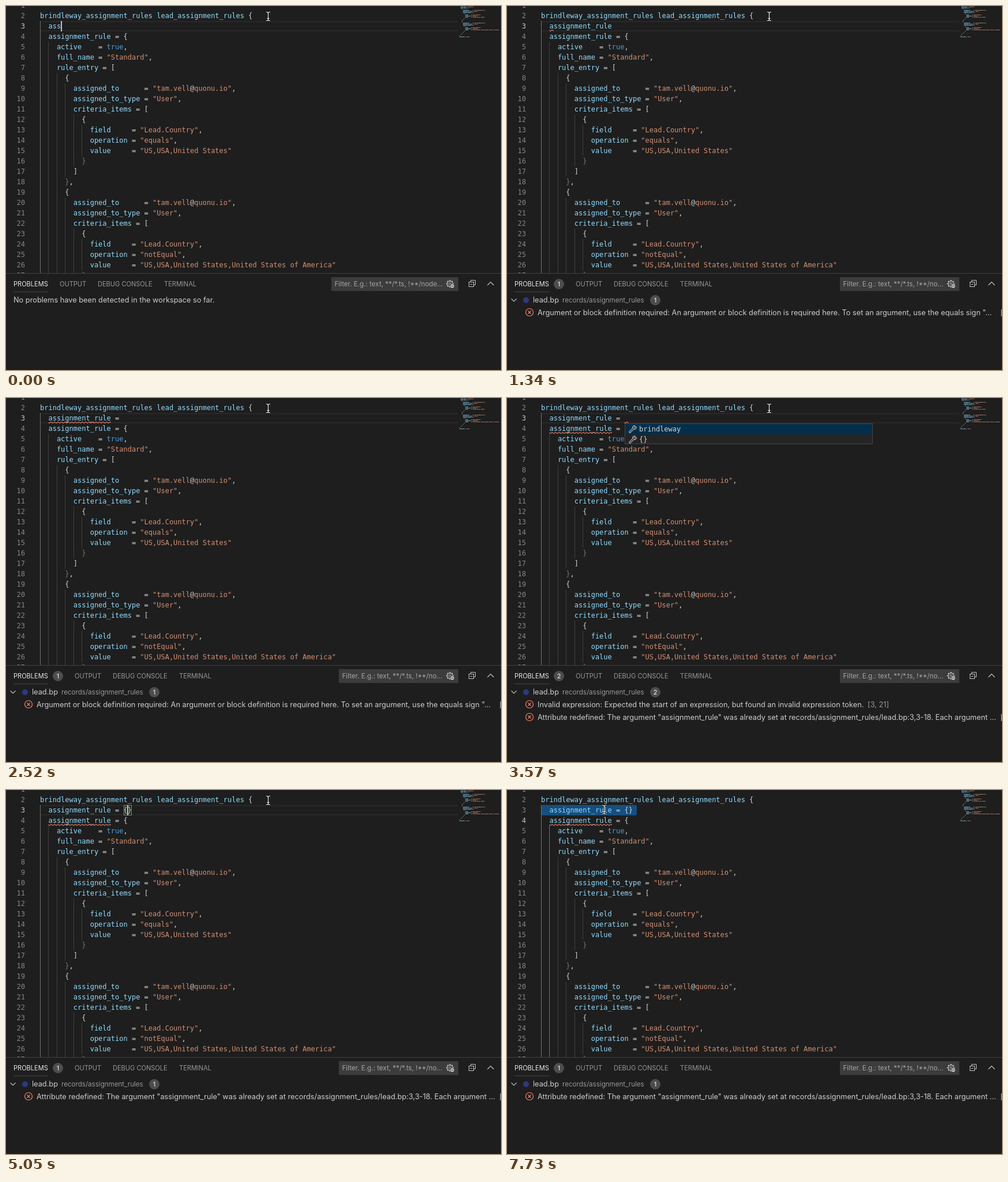
An HTML page with a canvas that plays this animation: 858x631 px, repeating every 8 s.

```html
<!DOCTYPE html>
<html lang="en">
<head>
<meta charset="utf-8">
<title>Editor</title>
<style>
html, body { margin: 0; width: 100%; height: 100%; overflow: hidden; background: #1e1e1e; }
canvas { display: block; }
</style>
</head>
<body>
<canvas id="stage" width="858" height="631"></canvas>
<script>
const ctx = document.getElementById('stage').getContext('2d');
const LOOP = 8000, X0 = 59, CW = 7.222, LH = 18, PANEL_Y = 463;
const MONO = '12px "DejaVu Sans Mono", monospace';
const ui = size => size + 'px Inter, sans-serif';
const BODY = ui(12.77), SMALL = ui(11.6), TAB = ui(11.05);
const BG = '#1e1e1e', FG = '#d4d4d4', PROP = '#8fdcff', STR = '#d38f73',
  KEY = '#4a9cd8', FADED = '#767676', ERR = '#f88065', DIM = '#989898',
  SELECTED = '#164f7f';

const colX = col => X0 + col * CW;
const lineY = n => 26 + (n - 3) * LH;

// Code, starting at line 4; line 2 and the edited line 3 come separately.
const entry = (op, value) => [
  '      {',
  '        assigned_to      = "tam.vell@quonu.io",',
  '        assigned_to_type = "User",',
  '        criteria_items = [',
  '          {',
  '            field     = "Lead.Country",',
  `            operation = "${op}",`,
  `            value     = "${value}"`,
  '          }',
  '        ]'
];
const CODE = [
  '  assignment_rule = {',
  '    active    = true,',
  '    full_name = "Standard",',
  '    rule_entry = [',
  ...entry('equals', 'US,USA,United States'),
  '      },',
  ...entry('notEqual', 'US,USA,United States,United States of America'),
  '      }', '    ]', '  }', '  full_name = "lead"'
];
const HEADER = 'brindleway_assignment_rules lead_assignment_rules {';

const ARG = 'Argument or block definition required: An argument or block definition is required here. To set an argument, use the equals sign "...';
const INVALID = 'Invalid expression: Expected the start of an expression, but found an invalid expression token.';
const REDEFINED = 'Attribute redefined: The argument "assignment_rule" was already set at records/assignment_rules/lead.bp:3,3-18. Each argument ...';

// Timelines: [start in ms, value]
const LINE3 = [[0, '  ass'], [740, '  assignment_rule '], [1930, '  assignment_rule ='],
  [2080, '  assignment_rule = '], [4010, '  assignment_rule = {}']];
const CARET = [[0, 5], [450, -1], [740, 18], [1340, -1], [1930, 19], [2080, 20], [2520, -1],
  [3120, 20], [3570, -1], [4010, 21], [4460, -1], [5050, 21], [5500, -1], [6090, 21],
  [6530, -1], [6980, 15], [7130, 17], [7280, 0], [7730, -1]];
const VALUES = ['brindleway', '{}'];
const POPUP = [[0, null], [450, { col: 5, items: ['assignment_rule'], sel: 0 }], [740, null],
  [1640, { col: 18, items: ['='], sel: 0 }], [1930, null],
  [3570, { col: 20, items: VALUES, sel: 0 }], [3710, { col: 20, items: VALUES, sel: 1 }], [4010, null]];
const ERRORS = [[0, []], [890, [ARG]], [2670, [INVALID, REDEFINED]], [4460, [REDEFINED]]];
// Squiggles: line, column, length
const WAVES = [[0, []], [890, [[3, 2, 1]]], [1640, [[3, 2, 15]]],
  [2670, [[3, 20, 1], [4, 2, 15]]], [4460, [[4, 2, 15]]]];

function at(track, t) {
  let value;
  for (const [start, v] of track) if (t >= start) value = v;
  return value;
}

function rect(x, y, w, h, color) {
  ctx.fillStyle = color;
  ctx.fillRect(x, y, w, h);
}

function text(s, x, y, font, color, align = 'left') {
  ctx.font = font;
  ctx.fillStyle = color;
  ctx.textAlign = align;
  ctx.fillText(s, x, y);
}

function path(points, color, width = 1) {
  ctx.strokeStyle = color;
  ctx.lineWidth = width;
  ctx.beginPath();
  points.forEach(([x, y]) => ctx.lineTo(x, y));
  ctx.stroke();
}

function ring(x, y, r, color, width = 1, from = 0, to = 2 * Math.PI) {
  ctx.strokeStyle = color;
  ctx.lineWidth = width;
  ctx.beginPath();
  ctx.arc(x, y, r, from, to);
  ctx.stroke();
}

function disc(x, y, r, color) {
  ctx.fillStyle = color;
  ctx.beginPath();
  ctx.arc(x, y, r, 0, 2 * Math.PI);
  ctx.fill();
}

// Splits a code line into [column, text, color].
function tokens(line) {
  const out = [];
  for (const m of line.matchAll(/"[^"]*"|\w+|[^\s\w]/g)) {
    let col = m.index;
    if (m[0][0] === '"') {
      for (const part of m[0].split(/(@)/)) {
        out.push([col, part, part === '@' ? FG : STR]);
        col += part.length;
      }
    } else {
      const color = m[0] === 'true' ? KEY : /\w/.test(m[0]) ? PROP : FG;
      out.push([col, m[0], color]);
    }
  }
  return out;
}

function codeLine(line, n) {
  const faded = /^ {6,}\}/.test(line);
  for (const [col, s, color] of tokens(line))
    text(s, colX(col), lineY(n) + 13, MONO, faded && s === '}' ? FADED : color);
}

function guides(active) {
  for (let n = 3; n <= 27; n++) {
    const indent = n === 3 ? 2 : CODE[n - 4].search(/\S/);
    for (let c = 0; c < indent; c += 2)
      rect(Math.round(colX(c)), lineY(n), 1, LH, c <= active ? '#707070' : '#404040');
  }
}

function squiggle([n, col, len]) {
  const x = colX(col), y = lineY(n) + 15, w = len * CW;
  ctx.save();
  ctx.beginPath();
  ctx.rect(x, y, w, 3);
  ctx.clip();
  const points = [];
  for (let i = -6; i < w + 6; i += 6) points.push([x + i + 1.75, y + 2.6], [x + i + 4.75, y + 0.4]);
  path(points, ERR, 1.1);
  ctx.restore();
}

function minimap() {
  CODE.forEach((line, i) => {
    for (const [col, s, color] of tokens(line))
      [...s].forEach((ch, k) => {
        if (ch === ' ') return;
        ctx.globalAlpha = /[.,_"]/.test(ch) ? 0.35 : 0.75;
        rect(784 + col + k, 2 * (i + 4) - 11, 1, 1, color);
      });
  });
  ctx.globalAlpha = 1;
}

function wrench(x, y, bg) {
  const gray = '#c5c5c5';
  ctx.lineCap = 'round';
  ring(x + 3, y - 3, 3, gray, 1.1, -0.3, 1.5 * Math.PI + 0.3);
  path([[x + 1, y - 1], [x - 5, y + 5]], gray, 3.6);
  path([[x + 1.4, y - 1.4], [x - 5, y + 5]], bg, 1.5);
  path([[x + 5.8, y - 4], [x + 3.6, y - 3], [x + 3.2, y - 5.8]], gray, 1);
  ctx.lineCap = 'butt';
}

function popup({ col, items, sel }) {
  const x = Math.round(colX(col) + 0.2), y = 44, h = LH * items.length;
  rect(x, y, 430, h, '#454545');
  rect(x + 1, y + 1, 428, h - 2, '#252526');
  items.forEach((item, i) => {
    const top = y + i * LH, bg = i === sel ? '#022f4c' : '#252526';
    rect(x + 1, top + 1, 428, Math.min(LH, y + h - top - 2), bg);
    wrench(x + 14, top + 10, bg);
    text(item, x + 25, top + 14, MONO, FG);
  });
}

function pointer(t) {
  const u = t < 5500 ? 0 : Math.min(8, Math.floor((t - 5500) / 147.1 + 0.02) + 1) / 8;
  const e = u * u * (3 - 2 * u);
  const x = Math.round(454 - 286 * e) + 0.5;
  const y = Math.round(18 * (1 - e) ** 2 - 12 * e * (1 - e) + 34 * e * e);
  const beam = (color, width) => {
    path([[x, y - 6], [x, y + 6]], color, width);
    for (const s of [-1, 1])
      path([[x - 3.5, y + 7.5 * s], [x - 1.5, y + 7.5 * s], [x, y + 6 * s],
        [x + 1.5, y + 7.5 * s], [x + 3.5, y + 7.5 * s]], color, width);
    path([[x - 2, y + 3.5], [x + 2, y + 3.5]], color, width);
  };
  beam('#111', 2.6);
  beam('#f4f4f4', 1.2);
}

function editor(t) {
  const line3 = at(LINE3, t), caret = at(CARET, t);
  const row = t >= 7280 ? 4 : 3;
  const wordPicked = t >= 7130 && t < 7280;

  ctx.save();
  ctx.beginPath();
  ctx.rect(0, 0, 858, PANEL_Y);
  ctx.clip();

  if (t < 7130) {
    rect(X0, 26, 725, 18, '#282828');
    rect(X0, 28, 725, 14, BG);
  }
  if (wordPicked) {
    const w = 15 * CW;
    rect(colX(2), 26, w, LH, SELECTED);
    for (const [n, col] of [[2, 11], [2, 33], [4, 2]])
      rect(colX(col), lineY(n), w, LH, 'rgba(173,214,255,.15)');
  }
  if (row === 4) {
    ctx.fillStyle = SELECTED;
    ctx.beginPath();
    ctx.roundRect(X0, 26, 166, LH, 3);
    ctx.fill();
  }
  guides(row === 4 ? 2 : 0);
  if (t >= 4010 && t < 6980) {
    rect(204, 26, 14, LH, '#888');
    rect(205, 27, 12, LH - 2, '#1b251b');
  }

  for (let n = 1; n <= 27; n++)
    text(n, 33, lineY(n) + 13, MONO, n === row ? '#c6c6c6' : '#858585', 'right');
  codeLine(HEADER, 2);
  codeLine(line3, 3);
  for (let n = 4; n <= 27; n++) codeLine(CODE[n - 4], n);
  at(WAVES, t).forEach(squiggle);
  minimap();

  if (caret >= 0) rect(Math.floor(colX(caret)), lineY(row), 2, LH, '#c4c5c3');
  const list = at(POPUP, t);
  if (list) popup(list);
  pointer(t);
  ctx.restore();
}

function badge(x, y, n) {
  disc(x, y, 9, '#4d4d4d');
  text(n, x, y + 4, ui(11), '#fff', 'center');
}

function toolIcons() {
  const c = '#c5c5c5';
  // Filter gear
  ring(769.5, 481.5, 4.6, c, 1.1);
  for (let i = 0; i < 8; i++) {
    const a = i * Math.PI / 4, dx = Math.cos(a), dy = Math.sin(a);
    path([[769.5 + dx * 4.6, 481.5 + dy * 4.6], [769.5 + dx * 6.6, 481.5 + dy * 6.6]], c, 2);
  }
  ring(769.5, 481.5, 1.7, c);
  disc(773.5, 485.5, 4, '#3c3c3c');
  disc(773.5, 485.5, 3.2, c);
  path([[771.5, 485.5], [775.5, 485.5]], '#3c3c3c');
  // Collapse all
  path([[805.5, 479], [805.5, 475.5], [813.5, 475.5], [813.5, 483.5], [811, 483.5]], c);
  ctx.strokeRect(802.5, 478.5, 8, 8);
  path([[804.5, 482.5], [808.5, 482.5]], c);
  // Maximize panel
  path([[834.5, 484], [840, 478.5], [845.5, 484]], c, 1.2);
}

function errorRow(message, y) {
  ring(39, y - 1, 6.5, ERR, 1.2);
  path([[36.5, y - 3.5], [41.5, y + 1.5]], ERR, 1.2);
  path([[41.5, y - 3.5], [36.5, y + 1.5]], ERR, 1.2);
  text(message, 53, y + 4, BODY, '#ccc');
  if (message === INVALID) text('[3, 21]', 625, y + 4, BODY, DIM);
  else rect(856.5, y - 6, 1.5, 12, DIM);
}

function panel(t) {
  const errors = at(ERRORS, t), count = errors.length;
  const shift = count ? 26 : 0, filterX = count ? 577 : 564;

  rect(0, PANEL_Y, 858, 1, '#414141');
  text('PROBLEMS', 13, 486, TAB, '#e7e7e7');
  rect(13, 495, 60, 1, '#464646');
  [['OUTPUT', 93], ['DEBUG CONSOLE', 159], ['TERMINAL', 274]].forEach(([label, x]) =>
    text(label, x + shift, 486, TAB, '#979797'));

  rect(filterX, 470, 784 - filterX, 24, '#3c3c3c');
  text('Filter. E.g.: text, **/*.ts, !**/' + (count ? 'no...' : 'node...'),
    filterX + 5.5, 486, SMALL, '#a6a6a6');
  toolIcons();

  if (!count) {
    text('No problems have been detected in the workspace so far.', 13, 514, BODY, '#ccc');
    return;
  }
  badge(90, 482, count);
  path([[7.5, 507.5], [12, 512], [16.5, 507.5]], '#c5c5c5', 1.1);
  disc(33, 510, 5, '#2b3a85');
  text('lead.bp', 45, 514, BODY, '#ccc');
  text('records/assignment_rules', 96, 514, SMALL, DIM);
  badge(257, 510, count);
  errors.forEach((message, i) => errorRow(message, 532 + 22 * i));
}

const begin = performance.now();
function frame() {
  const t = (performance.now() - begin) % LOOP;
  rect(0, 0, 858, 631, BG);
  editor(t);
  panel(t);
  requestAnimationFrame(frame);
}
frame();
</script>
</body>
</html>
```
